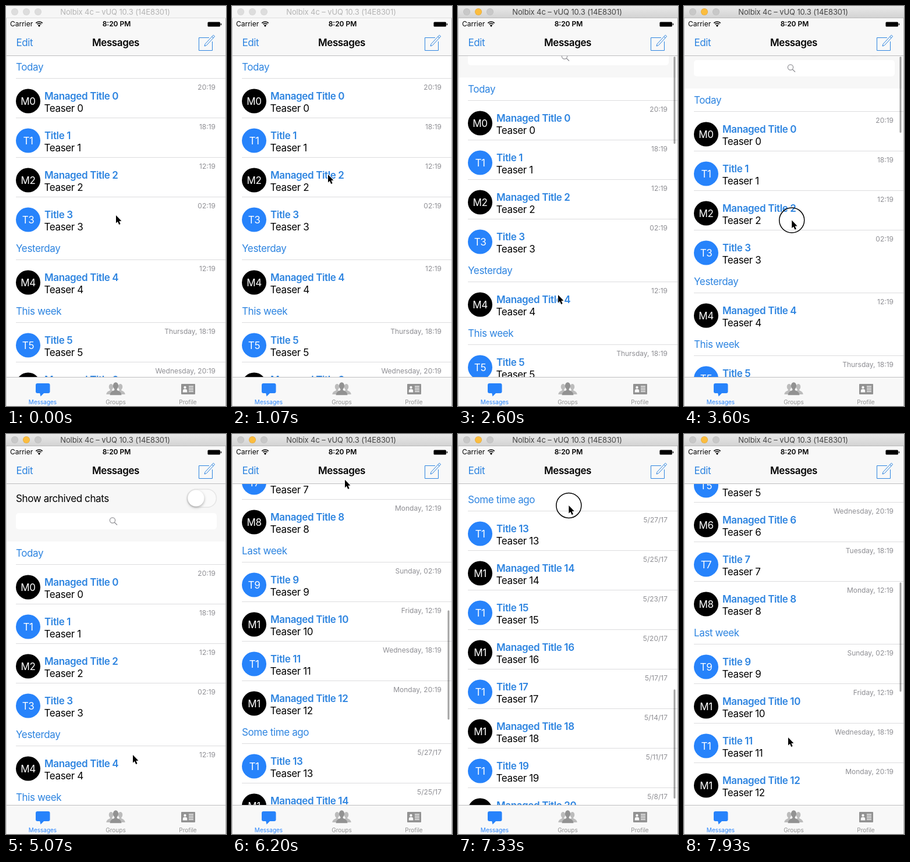
Write an HTML page with a canvas that moves like this. It is 378 by 688 pixels and loops after 8000 ms.

```html
<!DOCTYPE html>
<html lang="en">
<head>
<meta charset="utf-8">
<title>Messages</title>
<style>
html, body { margin: 0; width: 100%; height: 100%; overflow: hidden; background: #fff; }
canvas { display: block; width: 378px; height: 688px; }
</style>
</head>
<body>
<canvas id="stage"></canvas>
<script>
const W = 378, H = 688, LOOP = 8000, STEP = 1000 / 15;
const NAV_BOTTOM = 85, TAB_TOP = 638, VIEW = TAB_TOP - NAV_BOTTOM;
const BLUE = '#2d84e0', FILL = '#2783fb', GRAY = '#929292', BAR = '#f8f8f8';

const canvas = document.getElementById('stage');
const ctx = canvas.getContext('2d');
const dpr = window.devicePixelRatio || 1;
canvas.width = W * dpr;
canvas.height = H * dpr;

// List layout: section headers and rows, in unscrolled coordinates
const SECTIONS = { 0: 'Today', 4: 'Yesterday', 5: 'This week', 9: 'Last week', 13: 'Some time ago' };
const TIMES = ['20:19', '18:19', '12:19', '02:19', '12:19', 'Thursday, 18:19', 'Wednesday, 20:19',
  'Tuesday, 18:19', 'Monday, 12:19', 'Sunday, 02:19', 'Friday, 12:19', 'Wednesday, 18:19',
  'Monday, 20:19', '5/27/17', '5/25/17', '5/23/17', '5/20/17', '5/17/17', '5/14/17', '5/11/17', '5/8/17'];
const entries = [];
let bottom = NAV_BOTTOM - 1;
TIMES.forEach((time, i) => {
  if (SECTIONS[i]) {
    entries.push({ y: bottom, header: SECTIONS[i] });
    bottom += 40;
  }
  entries.push({ y: bottom, i, time });
  bottom += 68;
});
const MAX_SCROLL = bottom - TAB_TOP;
const BAR_RATIO = VIEW / (bottom - NAV_BOTTOM);

// Pointer path: time, x, y, pressed during the segment that starts here
const PATH = [
  [0, 189, 360], [70, 189, 360], [330, 171, 301], [670, 170, 300], [730, 165, 290],
  [1330, 165, 290, 1], [1700, 165, 506, 1], [1721, 165, 506], [1880, 165, 506],
  [2100, 171, 300, 1], [2410, 172, 497, 1], [2423, 172, 497], [2620, 172, 497],
  [3273, 183, 254, 1], [4060, 189, 560, 1], [4400, 189, 560], [5060, 218, 552],
  [5200, 218, 552], [5530, 187, 558], [5730, 187, 558, 1], [6050, 194, 79],
  [6740, 194, 77], [7250, 191, 100], [7300, 191, 100, 1], [7720, 179, 522], [LOOP, 179, 522]
];

const clamp = v => Math.max(0, Math.min(1, v));
const smooth = u => u * u * (3 - 2 * u);

function pointer(t) {
  let k = 0;
  while (k < PATH.length - 2 && t >= PATH[k + 1][0]) k++;
  const [t0, x0, y0, down] = PATH[k], [t1, x1, y1] = PATH[k + 1];
  const u = clamp((t - t0) / (t1 - t0));
  let e = smooth(u);
  if (t0 === 5730) e = u ** 1.4;
  if (t0 === 7300) e = u ** 1.15;
  return { x: x0 + (x1 - x0) * e, y: y0 + (y1 - y0) * e, down: !!down };
}

const rubber = d => d <= 0 ? 0 : VIEW * (1 - 1 / (d * 0.55 / VIEW + 1));
const spring = ms => { const k = ms * 0.011; return ms < 0 ? 1 : Math.exp(-k) * (1 + k); };
const glide = (from, to, ms) => to + (from - to) * Math.exp(-ms / 325);

// Vertical displacement of the list; positive while pulled down
function offset(t) {
  const y = pointer(t).y;
  if (t < 1330) return 0;
  if (t < 1721) return rubber(y - 290);
  if (t < 2100) return rubber(216) * spring(t - 1721);
  if (t < 2423) return Math.max(rubber(y - 300), rubber(216) * spring(t - 1721));
  if (t < 3273) return rubber(197) * spring(t - 2423);
  if (t < 4400) return rubber(y - 254);
  if (t < 5730) return 100 + (rubber(306) - 100) * spring(t - 4400);
  if (t < 6050) return 100 + y - 558;
  if (t < 7300) return glide(-379, -MAX_SCROLL, t - 6050);
  const start = glide(-379, -MAX_SCROLL, 1250);
  if (t < 7720) return start + y - 100;
  return glide(start + 422, start + 717, t - 7720);
}

function text(str, x, cy, size, color, { weight = 400, align = 'left', track = 0 } = {}) {
  ctx.font = `${weight} ${size}px Inter, sans-serif`;
  ctx.letterSpacing = track + 'px';
  ctx.textAlign = align;
  ctx.fillStyle = color;
  ctx.fillText(str, x, cy + size * 0.36);
}
const body = (str, x, cy, color, opt) => text(str, x, cy, 17, color, { track: -0.38, ...opt });

function rect(x, y, w, h, color) {
  ctx.fillStyle = color;
  ctx.fillRect(x, y, w, h);
}
function disc(x, y, r, color) {
  ctx.fillStyle = color;
  ctx.beginPath();
  ctx.arc(x, y, r, 0, 7);
  ctx.fill();
}
function round(x, y, w, h, r, color) {
  ctx.fillStyle = color;
  ctx.beginPath();
  ctx.roundRect(x, y, w, h, r);
  ctx.fill();
}
function poly(points, close = true) {
  ctx.beginPath();
  points.forEach(([x, y]) => ctx.lineTo(x, y));
  if (close) ctx.closePath();
}
function pen(color, width) {
  ctx.strokeStyle = color;
  ctx.lineWidth = width;
}

function drawPanel(off) {
  rect(1, NAV_BOTTOM, 376, off, '#f7f7f7');
  body('Show archived chats', 17, off + 11, '#000');
  ctx.beginPath();
  ctx.roundRect(311, off - 5, 50.5, 31, 15.5);
  ctx.fillStyle = '#fafafa';
  ctx.fill();
  pen('#e5e5e5', 1.5);
  ctx.stroke();
  ctx.save();
  ctx.shadowColor = 'rgba(0,0,0,.3)';
  ctx.shadowBlur = 4;
  ctx.shadowOffsetY = 2;
  disc(326.5, off + 10.5, 14, '#fff');
  ctx.restore();
  round(17, off + 36, 345, 28, 5, '#fff');
  pen('#8e8e93', 1.2);
  ctx.beginPath();
  ctx.arc(183, off + 48.5, 4.6, 0, 7);
  ctx.moveTo(186.4, off + 52);
  ctx.lineTo(191, off + 56.5);
  ctx.stroke();
}

function drawRow({ i, time }, y) {
  const managed = i % 2 === 0;
  rect(17, y, 360, 1, '#dcdcde');
  disc(38, y + 39.5, 21, managed ? '#000' : FILL);
  body(((managed ? 'M' : 'T') + i).slice(0, 2), 38, y + 39.5, '#fff', { align: 'center' });
  body((managed ? 'Managed Title ' : 'Title ') + i, 66, y + 31, BLUE, { weight: 600 });
  body('Teaser ' + i, 65.5, y + 51.5, '#000');
  text(time, 360, y + 15.5, 12, '#8e8e93', { align: 'right' });
}

function drawList(off, t) {
  ctx.save();
  ctx.beginPath();
  ctx.rect(1, NAV_BOTTOM, 376, VIEW);
  ctx.clip();
  if (off > 0) drawPanel(off);
  for (const entry of entries) {
    const y = entry.y + off;
    if (y < 0 || y > TAB_TOP) continue;
    if (entry.header) body(entry.header, 17, y + 21, BLUE);
    else drawRow(entry, y);
  }
  const shown = t < 5600 ? clamp((t - 1330) / 60) * clamp((4950 - t) / 300) : clamp((t - 5730) / 60);
  if (shown > 0) {
    const full = VIEW * BAR_RATIO;
    const y = 87 + Math.max(0, -off) * BAR_RATIO;
    round(370.5, y, 3, full - Math.max(0, off), 1.5, `rgba(0,0,0,${0.36 * shown})`);
  }
  ctx.restore();
}

function drawTitleBar(active) {
  const shade = ctx.createLinearGradient(0, 0, 0, 20);
  shade.addColorStop(0, active ? '#e9e9e9' : '#f6f6f6');
  shade.addColorStop(1, active ? '#d3d3d3' : '#f6f6f6');
  rect(0, 0, W, 20, shade);
  rect(0, 20, W, 1, active ? '#b9b9b9' : '#dedede');
  [15, 35, 55].forEach((x, k) => {
    disc(x, 10, 6, active ? (k === 1 ? '#e0a53a' : '#bcbcbc') : '#d3d3d3');
    disc(x, 10, 5.4, active ? (k === 1 ? '#fbbd3f' : '#c8c8c8') : '#dddddd');
  });
  text('Nolbix 4c – vUQ 10.3 (14E8301)', 187.5, 10.5, 13, active ? '#444' : '#b4b4b4',
    { align: 'center', track: -0.1 });
}

function drawNav() {
  rect(1, 21, 376, 64, BAR);
  rect(1, NAV_BOTTOM, 376, 1, '#bdbdbf');
  text('Carrier', 7, 31, 12, '#000');
  text('8:20 PM', 190, 31, 12, '#000', { weight: 600, align: 'center' });

  pen('#000', 1.7);
  for (const r of [8, 5]) {
    ctx.beginPath();
    ctx.arc(57, 35, r, -Math.PI * 0.75, -Math.PI * 0.25);
    ctx.stroke();
  }
  ctx.fillStyle = '#000';
  ctx.beginPath();
  ctx.moveTo(57, 36);
  ctx.arc(57, 35.5, 3, -Math.PI * 0.75, -Math.PI * 0.25);
  ctx.fill();

  round(346.5, 27.5, 21.5, 8, 1.5, '#000');
  round(368.8, 29.7, 1.4, 3.6, 0.7, '#000');

  body('Edit', 17.5, 63, BLUE);
  body('Messages', 188.5, 63, '#000', { weight: 600, align: 'center' });
  pen(BLUE, 1);
  poly([[349, 54.5], [331.5, 54.5], [331.5, 76.5], [354.5, 76.5], [354.5, 61]], false);
  ctx.stroke();
  poly([[341, 69], [342.2, 65.3], [356.3, 50], [358.7, 52.2], [344.6, 67.6]]);
  ctx.fillStyle = BAR;
  ctx.fill();
  ctx.stroke();
  poly([[353.8, 52.7], [356.2, 54.9]], false);
  ctx.stroke();
}

function drawPerson(x, y, s, color) {
  ctx.fillStyle = color;
  ctx.beginPath();
  ctx.ellipse(x, y, 4.6 * s, 6 * s, 0, 0, 7);
  ctx.fill();
  ctx.fillRect(x - 2.2 * s, y + 3 * s, 4.4 * s, 6 * s);
  ctx.beginPath();
  ctx.moveTo(x - 10 * s, y + 16 * s);
  ctx.quadraticCurveTo(x - 10 * s, y + 10 * s, x - 2 * s, y + 7.5 * s);
  ctx.lineTo(x + 2 * s, y + 7.5 * s);
  ctx.quadraticCurveTo(x + 10 * s, y + 10 * s, x + 10 * s, y + 16 * s);
  ctx.fill();
}

function drawTabs() {
  rect(1, TAB_TOP, 376, 50, BAR);
  rect(1, TAB_TOP, 376, 1, '#bfbfc1');
  round(51, 649, 24.5, 17, 3, FILL);
  poly([[58, 665], [66, 665], [59.5, 671.5]]);
  ctx.fill();

  drawPerson(180.5, 655, 0.82, '#bcbcbc');
  drawPerson(196.5, 655, 0.82, '#bcbcbc');
  drawPerson(188.5, 653.2, 1, GRAY);

  round(301, 650, 24, 18, 1, GRAY);
  disc(307.5, 656, 2.2, BAR);
  round(303.8, 659, 7.5, 5.5, [3, 3, 0, 0], BAR);
  for (let k = 0; k < 4; k++) rect(314, 653.5 + k * 3, 8, 1.4, BAR);

  [['Messages', 63, FILL], ['Groups', 188.5, GRAY], ['Profile', 312.5, GRAY]]
    .forEach(([label, x, color]) => text(label, x, 681, 10, color, { align: 'center' }));
}

function drawPointer({ x, y, down }) {
  if (down) {
    pen('#000', 1.5);
    ctx.beginPath();
    ctx.arc(x, y, 21.5, 0, 7);
    ctx.stroke();
  }
  poly([[0, 0], [0, 13.5], [3, 10.8], [5.2, 16], [7.6, 15], [5.4, 10], [9.4, 9.8]]
    .map(([dx, dy]) => [x + dx, y + dy]));
  ctx.lineJoin = 'round';
  pen('#fff', 2);
  ctx.stroke();
  ctx.fillStyle = '#000';
  ctx.fill();
  ctx.lineJoin = 'miter';
}

function draw(t) {
  ctx.setTransform(dpr, 0, 0, dpr, 0, 0);
  rect(0, 0, W, H, '#fff');
  drawList(Math.round(offset(t)), t);
  drawNav();
  drawTabs();
  drawTitleBar(t >= 1330);
  rect(0, 21, 1, H, '#c9c9c9');
  rect(377, 21, 1, H, '#b5b5b5');
  drawPointer(pointer(t));
}

// The picture advances at 15 steps per second
const begin = performance.now();
function tick() {
  const t = (performance.now() - begin) % LOOP;
  draw(Math.floor((t + 5) / STEP) * STEP % LOOP);
  requestAnimationFrame(tick);
}
tick();
</script>
</body>
</html>
```
